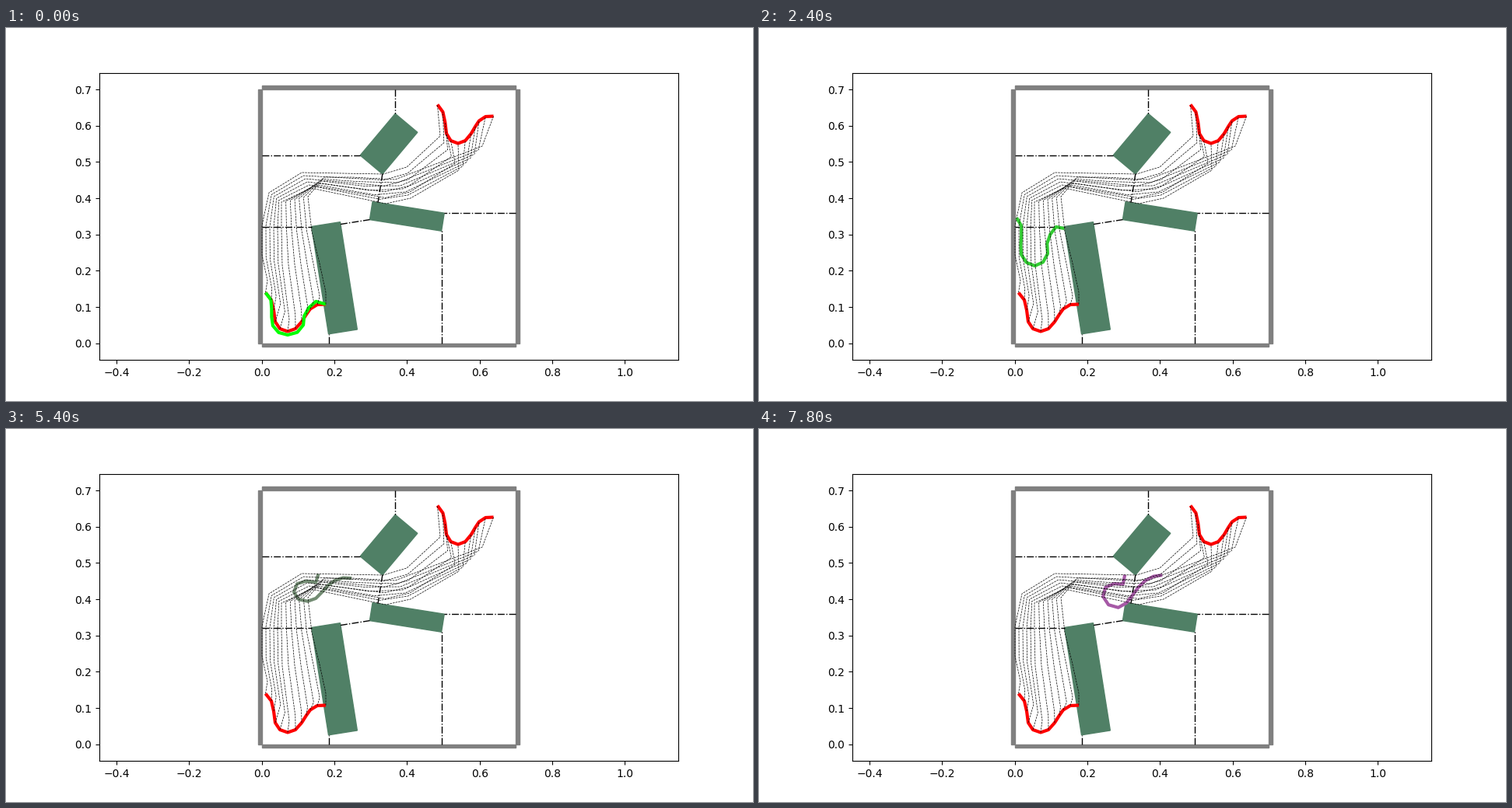
These frames come from a looping animation (960x480 px, 8000 ms). A matplotlib script:

```python
import numpy as np
import matplotlib.pyplot as plt
from matplotlib.animation import FuncAnimation
from matplotlib.patches import Rectangle

FRAMES, STEP_MS = 40, 200
SCALE, X0, Y0 = 466.67, 328.67, 405.73   # stage pixels per unit, origin
ROOM = 0.7                               # side of the walled square
LINK = 12.3                              # rope link length in pixels

# Curves in stage pixels, y down
START = np.array([(333.5, 340.5), (341, 350), (344, 363), (346, 378), (352, 387),
                  (362, 390.5), (372, 387), (380, 378), (386, 368.5), (391, 361.5),
                  (400, 356), (411, 355.5)])
GOAL = START * (0.93, 1) + (244.3, -242)

# Routes of the first, the lowest and the last point between start and goal
FIRST = [(336, 325), (329, 292), (329, 254), (338, 212), (380, 186), (485, 188),
         (515, 179), (558, 139)]
LOWEST = [(364, 375), (355, 305), (354, 258), (354, 224), (392, 206), (488, 226),
          (520, 219), (582, 183)]
LAST = [(411, 340), (403, 303), (393, 262), (388, 217), (409, 192), (445, 192),
        (500, 195), (612, 152)]
SAG = [(362, 395), (354.5, 306), (354, 256), (378, 221), (434, 225), (463, 230)]

# Link headings in degrees while hanging and while pulled sideways
HANGING = np.array([56, 86, 90, 83, 53, 20, -19, -55, -88, -65, -46, 14])
PULLED = np.array([105, 184, 159, 109, 59, 16, -20, -43, -45, -35, -18, 0])


def data(points):
    """Stage pixels to axes units."""
    p = np.asarray(points, float)
    return np.column_stack([(p[:, 0] - X0) / SCALE, (Y0 - p[:, 1]) / SCALE])


def corners(cx, cy, w, h, deg):
    """Corners of a turned box: lower left, lower right, upper right, upper left."""
    a = np.radians(deg)
    u = np.array([np.cos(a), np.sin(a)]) * w / 2
    v = np.array([-np.sin(a), np.cos(a)]) * h / 2
    return [np.array([cx, cy]) + i * u + j * v
            for i, j in ((-1, -1), (1, -1), (1, 1), (-1, 1))]


def foot(p, a, b):
    """Nearest point to p on the line through a and b."""
    d = b - a
    return a + d * np.dot(p - a, d) / np.dot(d, d)


def travel(path, length, t, ease):
    """Point on a path, slowing down a little on the way."""
    path = np.asarray(path, float)
    u = t / (FRAMES - 1)
    s = length * (u + ease * u * (1 - u))
    arc = np.insert(np.cumsum(np.hypot(*np.diff(path, axis=0).T)), 0, 0)
    return np.array([np.interp(s, arc, path[:, k]) for k in (0, 1)])


def chain(a, b, angles):
    """Links with given headings, stretched slightly to run from a to b."""
    steps = LINK * np.column_stack([np.cos(angles), np.sin(angles)])
    steps += (b - a - steps.sum(axis=0)) / len(steps)
    return a + np.vstack([[0, 0], np.cumsum(steps, axis=0)])


def rope(t):
    head = travel([START[0]] + FIRST, 270, t, 0.25)
    mid = travel(SAG, 266, t, 0.13)
    tail = travel([START[-1]] + LAST, 284, t, 0.2)
    u = np.clip((t - 12) / 16, 0, 1)
    pull = u * u * (3 - 2 * u)
    angles = np.radians(HANGING + pull * (PULLED - HANGING))
    return np.vstack([chain(head, mid, angles[:6]), chain(mid, tail, angles[6:])[1:]])


def guide(i):
    """Path of one point, blended from the three known routes."""
    inner = [[np.interp(i, (0, 5, 11), (a[k], b[k], c[k])) for k in (0, 1)]
             for a, b, c in zip(FIRST, LOWEST, LAST)]
    return np.vstack([START[i], inner, GOAL[i]])


fig, ax = plt.subplots(figsize=(9.6, 4.8), dpi=100)
fig.subplots_adjust(left=0.125, right=0.9, bottom=0.11, top=0.88)
ax.set_xlim(0.35 - 372 / SCALE, 0.35 + 372 / SCALE)
ax.set_ylim(-0.046, 0.746)
ax.set_xticks(np.arange(-2, 6) * 0.2)
ax.set_yticks(np.arange(8) * 0.1)

for side in (-0.01, ROOM):
    ax.add_patch(Rectangle((side, 0), 0.01, ROOM, color="gray"))
    ax.add_patch(Rectangle((0, side), ROOM, 0.01, color="gray"))

boxes = [(0.35, 0.55, 0.15, 0.08, 50), (0.4, 0.35, 0.2, 0.05, -9),
         (0.2, 0.18, 0.08, 0.3, 9)]
for cx, cy, w, h, deg in boxes:
    ax.add_patch(Rectangle((cx - w / 2, cy - h / 2), w, h, angle=deg,
                           rotation_point="center", color="#508066"))

# Passages: from the walls to box corners, and between neighbouring boxes
upper, right, left = [corners(*box) for box in boxes]
passages = [
    [(upper[2][0], ROOM), upper[2]],
    [(0, upper[0][1]), upper[0]] if upper[0][0] < upper[3][0] else
    [(0, upper[3][1]), upper[3]],
    [min(upper, key=lambda p: p[1]), None],
    [(ROOM, right[2][1]), right[2]],
    [(right[1][0], 0), right[1]],
    [foot(right[0], left[1], left[2]), right[0]],
    [(0, left[3][1]), left[3]],
    [(left[0][0], 0), left[0]],
]
passages[2][1] = foot(passages[2][0], right[3], right[2])
for a, b in passages:
    ax.plot([a[0], b[0]], [a[1], b[1]], "k-.", lw=1)

for curve in (START, GOAL):
    ax.plot(*data(curve).T, color="red", lw=3, solid_capstyle="butt", zorder=3)
for i in range(len(START)):
    ax.plot(*data(guide(i)).T, "k--", lw=0.5, zorder=5)
line, = ax.plot([], [], lw=3, solid_capstyle="butt", zorder=4)


def draw(t):
    fade = t / 60
    line.set_data(*data(rope(t)).T)
    line.set_color((fade, 1 - fade, fade))
    return line,


anim = FuncAnimation(fig, draw, frames=FRAMES, interval=STEP_MS,
                     init_func=lambda: draw(0), repeat=True, repeat_delay=0)
plt.show()
```
